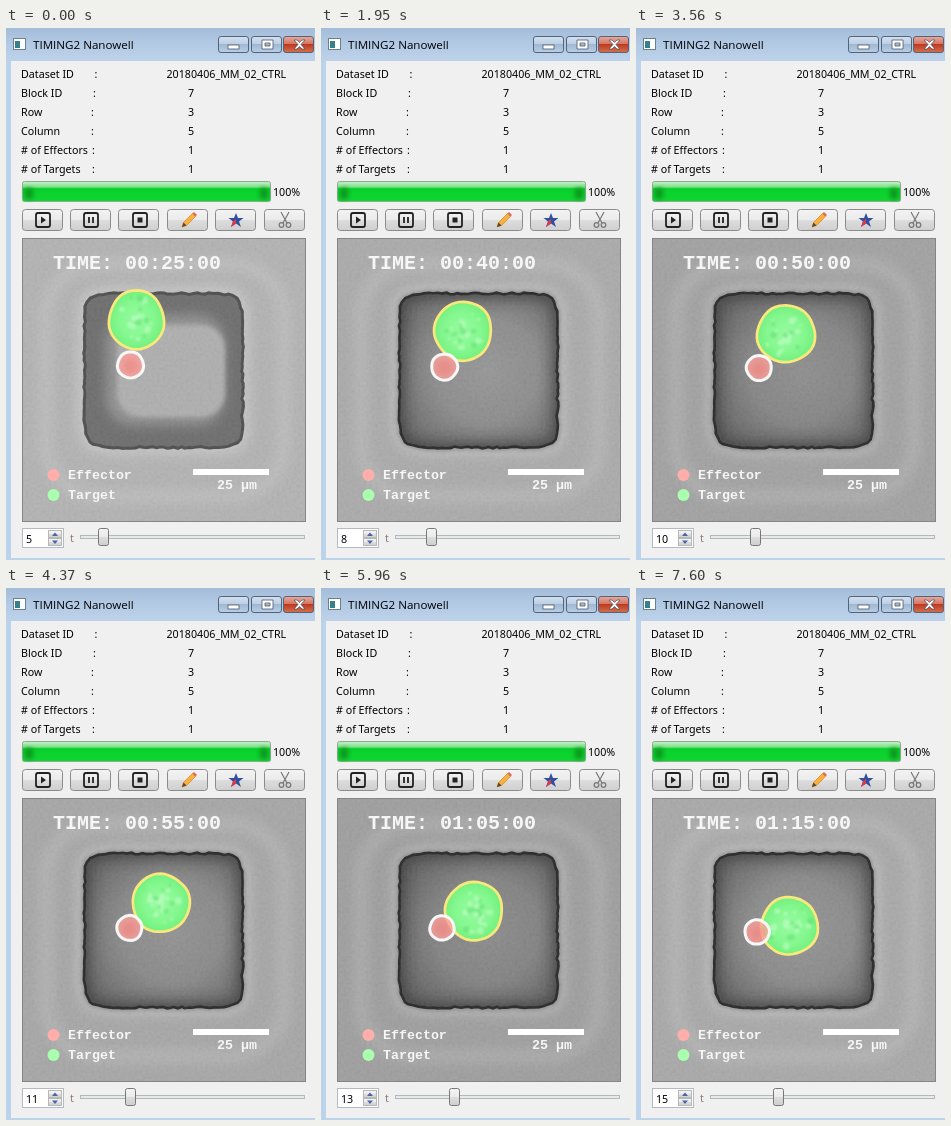
Animation of 309 by 532 pixels, one loop 8 s. Source, as an HTML page:

```html
<!DOCTYPE html>
<html lang="en">
<head>
<meta charset="utf-8">
<title>Nanowell viewer</title>
<style>
  html, body { margin: 0; width: 100%; height: 100%; overflow: hidden; background: #f0f0f0; }
  svg { display: block; width: 100vw; height: 100vh; }
  text { white-space: pre; }
  .ui { font: 10.7px "Noto Sans", "Open Sans", sans-serif; fill: #000; }
  .mono { font: bold 13.3px "Liberation Mono", monospace; fill: #f6f6f6; }
</style>
</head>
<body>
<svg viewBox="0 0 309 532" preserveAspectRatio="none">
  <defs>
    <linearGradient id="title" x2="0" y2="1">
      <stop stop-color="#a3bcd9"/><stop offset=".5" stop-color="#b3cae4"/><stop offset="1" stop-color="#bdd2ea"/>
    </linearGradient>
    <linearGradient id="button" x2="0" y2="1">
      <stop stop-color="#f3f3f3"/><stop offset=".48" stop-color="#ebebeb"/>
      <stop offset=".5" stop-color="#dddddd"/><stop offset="1" stop-color="#cfcfcf"/>
    </linearGradient>
    <linearGradient id="caption" x2="0" y2="1">
      <stop stop-color="#d3e0ef"/><stop offset=".48" stop-color="#bccfe5"/>
      <stop offset=".5" stop-color="#a0b8d3"/><stop offset="1" stop-color="#b9cfe6"/>
    </linearGradient>
    <linearGradient id="close" x2="0" y2="1">
      <stop stop-color="#e9a99a"/><stop offset=".48" stop-color="#d4735f"/>
      <stop offset=".5" stop-color="#bd3a22"/><stop offset="1" stop-color="#d5704c"/>
    </linearGradient>
    <linearGradient id="progress" x2="0" y2="1">
      <stop stop-color="#c5f2cb"/><stop offset=".28" stop-color="#7ee08a"/>
      <stop offset=".36" stop-color="#08cf2a"/><stop offset="1" stop-color="#10d632"/>
    </linearGradient>
    <radialGradient id="floor" cx=".55" cy=".5" r=".66">
      <stop stop-color="#000" stop-opacity=".12"/><stop offset=".5" stop-color="#000" stop-opacity=".18"/>
      <stop offset="1" stop-color="#000" stop-opacity=".42"/>
    </radialGradient>
    <radialGradient id="green">
      <stop stop-color="#96fba0"/><stop offset=".6" stop-color="#86f890"/><stop offset="1" stop-color="#74f07f"/>
    </radialGradient>
    <filter id="soft1" x="-.3" y="-.3" width="1.6" height="1.6"><feGaussianBlur stdDeviation="1"/></filter>
    <filter id="soft2" x="-.3" y="-.3" width="1.6" height="1.6"><feGaussianBlur stdDeviation="2"/></filter>
    <filter id="soft6" x="-.3" y="-.3" width="1.6" height="1.6"><feGaussianBlur stdDeviation="6"/></filter>
    <filter id="grain" x="0" y="0" width="1" height="1">
      <feTurbulence type="fractalNoise" baseFrequency=".35" numOctaves="2" seed="4"/>
      <feColorMatrix values="1 0 0 0 0  1 0 0 0 0  1 0 0 0 0  0 0 0 0 .07"/>
    </filter>
    <clipPath id="scopeClip"><rect x="17" y="211" width="282" height="282"/></clipPath>
    <clipPath id="wellClip"><path class="well"/></clipPath>
  </defs>

  <rect width="309" height="532" fill="#f0f0f0"/>
  <rect width="309" height="33" fill="url(#title)"/>
  <path d="M0 33h5v497h304v2H0z" fill="#bcd3ec"/>
  <rect x="7.500" y="10.500" width="12" height="11" fill="#fff" stroke="#6d7f92"/>
  <rect x="9" y="13" width="5" height="7" fill="#34818a"/>
  <text x="27" y="21" style="font: 11.6px 'Open Sans', sans-serif">TIMING2 Nanowell</text>
  <g id="captionButtons" stroke="#52637a"></g>
  <g fill="#fff" stroke="#4d5968" stroke-width=".8">
    <rect x="222" y="17" width="11" height="4"/>
    <path fill-rule="evenodd" d="M256 12h11v9h-11zM259 15h5v3h-5z"/>
    <path d="M288 12h3l2.500 2.500 2.500-2.500h3l-4 4.500 4 4.500h-3l-2.500-2.500-2.500 2.500h-3l4-4.500z"/>
  </g>

  <g id="info" class="ui"></g>

  <rect x="16.500" y="153.500" width="248" height="20" rx="2" fill="url(#progress)" stroke="#90aa92"/>
  <g fill="#078a1e" filter="url(#soft2)" opacity=".8"><rect x="19" y="160" width="8" height="11"/><rect x="254" y="160" width="8" height="11"/></g>
  <text class="ui" x="267" y="168">100%</text>

  <g id="toolButtons" fill="url(#button)" stroke="#8b8b8b"></g>
  <g fill="none" stroke="#222" stroke-width="1.800">
    <rect x="30" y="185" width="14" height="14" rx="2"/>
    <rect x="78" y="185" width="14" height="14" rx="2"/>
    <rect x="127" y="185" width="14" height="14" rx="2"/>
    <path d="M83 189v6M87 189v6"/>
  </g>
  <path d="M35 188.500l5 3.500-5 3.500zM131.500 189.500h5v5h-5z" fill="#222"/>
  <path d="M176 199l1.500-4.500 9-9 3 3-9 9z" fill="#f7b13c" stroke="#d0841f" stroke-width=".7"/>
  <path d="M176 199l1.500-4.500 3 3z" fill="#5c4632"/>
  <path d="M186.500 185.500l1.500-1.500 3 3-1.500 1.500z" fill="#e2665b"/>
  <path d="M230 185l2 5h5.500l-4.500 3.500 2 5.500-5-3.500-5 3.500 2-5.500-4.500-3.500h5.500z" fill="#304f9e"/>
  <path d="M230 191v4.500l-5 3.500 2-5.500z" fill="#e0384a"/>
  <g fill="none" stroke="#777" stroke-width="1.200">
    <path d="M275 184l6 11M283 184l-6 11"/>
    <circle cx="275.500" cy="197" r="2.300"/><circle cx="282.500" cy="197" r="2.300"/>
  </g>

  <g clip-path="url(#scopeClip)">
    <rect id="field" x="17" y="211" width="282" height="282"/>
    <g fill="none" stroke="#fff">
      <rect x="40" y="236" width="238" height="232" rx="52" stroke-width="14" opacity=".13" filter="url(#soft6)"/>
      <path class="well" stroke-width="14" opacity=".25" filter="url(#soft6)"/>
    </g>
    <g id="focused">
      <path class="well" fill="url(#floor)"/>
      <g clip-path="url(#wellClip)">
        <path class="well" fill="none" stroke="#222" stroke-width="16" opacity=".5" filter="url(#soft6)"/>
      </g>
      <path class="well" fill="none" stroke="#444" stroke-width="5" opacity=".4" filter="url(#soft2)"/>
      <path class="well" fill="none" stroke="#262626" stroke-width="2.600"/>
    </g>
    <g id="defocused">
      <path class="well" fill="#6c6c6c" stroke="#4c4c4c" stroke-width="3"/>
      <rect x="100" y="287" width="118" height="110" rx="26" fill="#929292" filter="url(#soft6)"/>
      <rect x="111" y="297" width="108" height="92" rx="24" fill="#aeaeae" filter="url(#soft2)"/>
    </g>
    <rect x="17" y="211" width="282" height="282" filter="url(#grain)"/>

    <path id="target" fill="url(#green)" stroke="#fbe87c" stroke-width="2.700"/>
    <g id="mottle" opacity=".45" filter="url(#soft1)"></g>
    <path id="effector" fill="#ffa09a" fill-opacity=".78" stroke="#f8f8f8" stroke-width="3"/>
    <path id="nucleus" fill="#e8736f" opacity=".35" filter="url(#soft2)"/>

    <text id="clock" class="mono" x="47" y="241" style="font-size: 20px"></text>
    <circle cx="47.500" cy="447" r="6" fill="#ffaeaa"/>
    <circle cx="47.500" cy="467" r="6" fill="#a9ffae"/>
    <text class="mono" x="62" y="451">Effector</text>
    <text class="mono" x="62" y="471">Target</text>
    <rect x="187" y="441" width="76" height="6" fill="#fff"/>
    <text class="mono" x="211" y="461">25 µm</text>
  </g>
  <rect x="16.500" y="210.500" width="283" height="283" fill="none" stroke="#858585"/>

  <rect x="16.500" y="500.500" width="41" height="19" fill="#fff" stroke="#b5b9c0"/>
  <g fill="url(#button)" stroke="#b8b8b8"><rect x="42.500" y="502.500" width="13" height="7"/><rect x="42.500" y="510.500" width="13" height="7"/></g>
  <path d="M46 508l3-3.500 3 3.500zM46 512.500l3 3.500 3-3.500z" fill="#4b66a6"/>
  <text id="count" class="ui" x="20" y="515"></text>
  <text class="ui" x="64" y="514" style="fill: #8d7b70">t</text>
  <rect x="74.500" y="507.500" width="224" height="3" fill="#e7eaea" stroke="#b5b8b8"/>
  <rect id="thumb" y="500.500" width="10" height="17" rx="2" fill="url(#button)" stroke="#777"/>
</svg>

<script>
const $ = id => document.getElementById(id);
const LOOP = 8000, FIRST_STEP = 5;
const starts = [0, 310, 1060, 1950, 2730, 3560, 4370, 5060, 5960, 6700, 7600];

// target x, y, rx, ry; effector x, y, radius; field grey
const poses = [
  [130.5, 292, 27.5, 29.5, 124.5, 337, 13, 178],
  [134, 295, 27.8, 29, 124, 337, 13, 170],
  [138, 297, 28.2, 28.7, 124, 337, 13, 170],
  [142, 303, 28.4, 29.5, 123.5, 339, 13, 170],
  [146, 310, 28.6, 30.2, 123, 340, 12.7, 174],
  [150, 306, 29, 28.4, 123, 340, 12.5, 161],
  [155, 315, 28.5, 29, 123.5, 340, 12.5, 166],
  [158.5, 323, 27.5, 30, 124, 339, 12.7, 170],
  [153, 323, 28.4, 29.2, 121, 340, 12.2, 158],
  [153, 331, 28.4, 29, 121, 342, 12.2, 163],
  [153.5, 338, 28.4, 28.7, 121, 344, 12.2, 168]
];

function randomFrom(seed) {
  return () => (seed = (seed * 16807) % 2147483647) / 2147483647;
}

function pathOf(points) {
  return "M" + points.map(p => p.map(n => n.toFixed(1)).join(" ")).join("L") + "Z";
}

function blob(x, y, rx, ry, phase) {
  return pathOf(Array.from({ length: 48 }, (_, i) => {
    const a = i * Math.PI / 24;
    const r = 1 + 0.016 * (Math.sin(3 * a + phase) + 0.7 * Math.sin(5 * a - phase * 2));
    return [x + rx * r * Math.cos(a), y + ry * r * Math.sin(a)];
  }));
}

// Rounded square with an uneven rim, as a superellipse.
function wellOutline() {
  const random = randomFrom(91), power = 10;
  const jitter = () => (random() - 0.5) * 1.8;
  return pathOf(Array.from({ length: 144 }, (_, i) => {
    const a = i * Math.PI / 72, c = Math.cos(a), s = Math.sin(a);
    const scale = (Math.abs(c) ** power + Math.abs(s) ** power) ** (-1 / power);
    return [157.5 + 79 * c * scale + jitter(), 342.5 + 77 * s * scale + jitter()];
  }));
}

function buildStatic() {
  document.querySelectorAll(".well").forEach(p => p.setAttribute("d", wellOutline()));

  $("captionButtons").innerHTML = [[213, "caption"], [246, "caption"], [278, "close"]].map(([x, fill]) =>
    `<rect x="${x - 0.5}" y="8.5" width="30" height="16" rx="2.5" fill="url(#${fill})"/>`).join("");

  $("toolButtons").innerHTML = [17, 65, 113, 162, 210, 259].map(x =>
    `<rect x="${x - 0.5}" y="181.5" width="40" height="21" rx="3"/>`).join("");

  $("info").innerHTML = [
    ["Dataset ID", 88.5, "20180406_MM_02_CTRL", 160.5], ["Block ID", 87, "7", 182], ["Row", 85, "3", 182],
    ["Column", 85, "5", 182], ["# of Effectors", 86, "1", 182], ["# of Targets", 86, "1", 182]
  ].map(([label, colon, value, x], i) => {
    const y = 50 + 19 * i;
    return `<text x="15" y="${y}">${label}</text><text x="${colon}" y="${y}">:</text><text x="${x}" y="${y}">${value}</text>`;
  }).join("");
}

function show(index) {
  const [x, y, rx, ry, ex, ey, er, grey] = poses[index];
  const step = FIRST_STEP + index, minutes = step * 5;
  const pad = n => String(n).padStart(2, "0");

  $("field").setAttribute("fill", `rgb(${grey},${grey},${grey})`);
  $("defocused").style.display = index ? "none" : "";
  $("focused").style.display = index ? "" : "none";

  $("target").setAttribute("d", blob(x, y, rx, ry, index * 1.3));
  $("effector").setAttribute("d", blob(ex, ey, er, er, index * 0.8));
  $("nucleus").setAttribute("d", blob(ex, ey + 1, er * 0.55, er * 0.55, index));

  const random = randomFrom(300 + index * 71);
  $("mottle").innerHTML = Array.from({ length: 26 }, (_, i) => {
    const a = random() * 2 * Math.PI, d = random() * 0.78;
    const fill = i % 3 ? "#d4ffd8" : "#5fd86c";
    return `<circle cx="${x + rx * d * Math.cos(a)}" cy="${y + ry * d * Math.sin(a)}" r="${1 + random() * 2.5}" fill="${fill}"/>`;
  }).join("");

  $("clock").textContent = `TIME: ${pad(Math.floor(minutes / 60))}:${pad(minutes % 60)}:00`;
  $("count").textContent = step;
  $("thumb").setAttribute("x", Math.round(91.5 + 4.5 * index) + 0.5);
}

let shown = -1;
function tick(now) {
  const time = now % LOOP;
  const index = starts.findLastIndex(start => start <= time);
  if (index !== shown) show(shown = index);
  requestAnimationFrame(tick);
}

buildStatic();
show(shown = 0);
requestAnimationFrame(tick);
</script>
</body>
</html>
```
